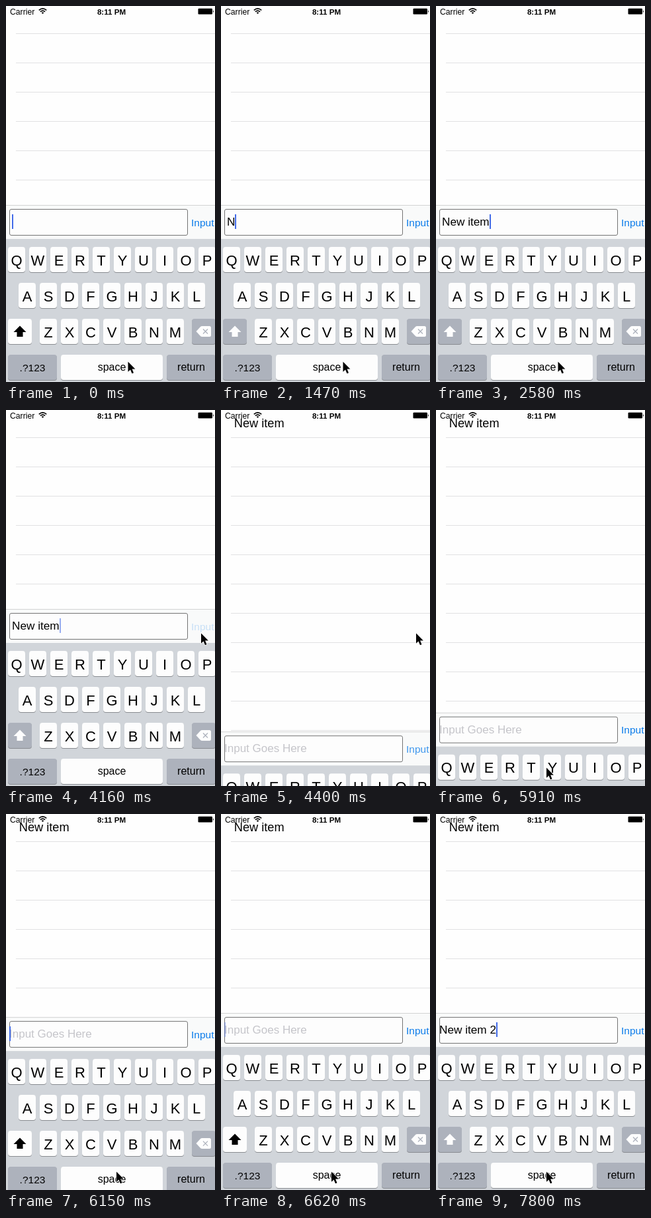
An HTML page for the animation above (8 s loop, 316 px wide and 565 px high).

```html
<!DOCTYPE html>
<html lang="en">
<head>
<meta charset="utf-8">
<title>Input bar above keyboard</title>
<style>
  html, body { margin: 0; width: 100%; height: 100%; overflow: hidden; background: #fefefe; }
  svg { display: block; width: 100vw; height: 100vh; }
  text { font-family: "Liberation Sans", Arial, sans-serif; white-space: pre; }
  .letter { font-size: 22px; text-anchor: middle; }
  .word { font-size: 16px; text-anchor: middle; }
</style>
</head>
<body>
<svg id="stage" viewBox="0 0 316 565">
  <rect width="316" height="565" fill="#fefefe"/>
  <g id="lines" fill="#e1e1e3"></g>
  <text id="row" x="19.8" y="26" font-size="18.2">New item</text>

  <g id="status">
    <text x="6" y="12.5" font-size="12.2">Carrier</text>
    <g fill="none" stroke="#000" stroke-width="1.6">
      <path d="M49.8 6.4Q55.5 1.4 61.2 6.4M51.9 8.7Q55.5 5.5 59.1 8.7"/>
      <path d="M53.6 9.9Q55.5 8.5 57.4 9.9L55.5 12Z" fill="#000" stroke="none"/>
    </g>
    <text x="159.5" y="12.5" font-size="11.6" font-weight="bold" text-anchor="middle">8:11 PM</text>
    <rect x="290.5" y="3.8" width="21.5" height="8.7" rx="1.3"/>
    <path d="M313 6.3Q315 8.2 313 10Z"/>
  </g>

  <g id="panel">
    <rect y="299" width="316" height="51" fill="#f9fafa"/>
    <rect y="299" width="316" height="1" fill="#d3d3d4"/>
    <rect x="5.5" y="305.5" width="269" height="39" rx="2.5" fill="#fdfdfd" stroke="#747474"/>
    <text id="hint" x="5" y="330" font-size="17" fill="#c5c5ca">Input Goes Here</text>
    <text id="typed" y="330" font-size="17.2"></text>
    <rect id="caret" y="313" width="2" height="22" fill="#426be8"/>
    <text id="button" x="280" y="330.5" font-size="15.5" fill="#0a7bea">Input</text>
    <rect y="350" width="316" height="216" fill="#d1d5da"/>
    <g id="keys"></g>
  </g>

  <path id="pointer" d="M0 0V15.2L3.5 12L6 17.8L8.5 16.8L6.1 11.1H10.9Z"
        stroke="#fff" stroke-width="1.3" paint-order="stroke"/>
</svg>
<script>
const LOOP = 8000, TRAVEL = 216;
const HIDE_AT = 4215, SHOW_AT = 5854;
const $ = id => document.getElementById(id);
const LIGHT = '#fdfdfd', DARK = '#adb2bc';

function key(x, y, w, fill, content = '', id = '') {
  return `<rect x="${x}" y="${y + 1}" width="${w}" height="38" rx="4" fill="#898c91"/>
    <rect ${id && `id="${id}"`} x="${x}" y="${y}" width="${w}" height="38" rx="4" fill="${fill}"/>${content}`;
}
const letterRow = (letters, x0, y) => [...letters].map((c, i) => {
  const x = x0 + i * 32;
  return key(x, y, 26, LIGHT, `<text class="letter" x="${x + 13}" y="${y + 27.5}">${c}</text>`);
}).join('');
const word = (label, x, y, size = 16) =>
  `<text class="word" x="${x}" y="${y}" style="font-size:${size}px">${label}</text>`;

$('lines').innerHTML = Array.from({ length: 12 }, (_, i) =>
  `<rect x="15" y="${41 + i * 44}" width="301" height="1"/>`).join('');

$('keys').innerHTML =
  letterRow('QWERTYUIOP', 3, 362) +
  letterRow('ASDFGHJKL', 19, 416) +
  letterRow('ZXCVBNM', 51, 470) +
  key(3, 470, 36, LIGHT, '<path id="arrow" d="M21 480.5L30.5 490H25.5V497H16.5V490H11.5Z" stroke-linejoin="round"/>', 'shift') +
  key(281, 470, 36, DARK,
    `<path d="M287.5 489L294 482Q295 481 296.500 481H307.500Q310 481 310 483.500V494.500Q310 497 307.500 497H296.500Q295 497 294 496Z" fill="#fdfdfd"/>
     <path d="M298 485.500L305 492.500M305 485.500L298 492.500" stroke="${DARK}" stroke-width="1.3"/>`) +
  key(3, 524, 74, DARK, word('.?123', 40, 549, 15.5)) +
  key(83, 524, 154, LIGHT, word('space', 160, 547.5)) +
  key(243, 524, 74, DARK, word('return', 280, 547.5));

// Each entry: time and the text shown from then on.
const typing = [
  [0, ''], [1470, 'N'], [1570, 'Ne'], [1660, 'New'], [1760, 'New '],
  [2170, 'New i'], [2350, 'New it'], [2460, 'New ite'], [2580, 'New item'],
  [4220, ''], [6920, 'N'], [7000, 'Ne'], [7080, 'New'], [7160, 'New i'],
  [7340, 'New it'], [7420, 'New ite'], [7510, 'New item'],
  [7690, 'New item '], [7800, 'New item 2']
];

// Caret opacity and pointer position, as time-stamped points.
const blink = [
  [0, 1], [430, 1], [590, 0], [890, 0], [1000, 1], [3040, 1], [3200, 0],
  [3500, 0], [3610, 1], [4090, 1], [4215, .2], [4220, 0], [6020, 0],
  [6080, 1], [6520, 1], [6680, 0], [6919, 0], [6920, 1], [LOOP, 1]
];
const pointerX = [[0, 184.5], [3030, 184.5], [3810, 292, 'inOut'], [3930, 295],
  [4930, 295], [4990, 276], [5550, 167, 'out'], [LOOP, 167]];
const pointerY = [[0, 534.5], [3030, 534.5], [3810, 336, 'inOut'], [3930, 335.5],
  [4930, 335.5], [4990, 353], [5550, 537.5, 'out'], [LOOP, 537.5]];

const eases = {
  linear: p => p,
  inOut: p => (1 - Math.cos(Math.PI * p)) / 2,
  out: p => Math.sin(Math.PI * p / 2)
};

function sample(points, t) {
  const i = Math.max(1, points.findIndex(p => p[0] > t));
  const [t0, a] = points[i - 1], [t1, b, ease = 'linear'] = points[i];
  return a + (b - a) * eases[ease]((t - t0) / (t1 - t0));
}

// Critically damped spring from 0 to 1.
function spring(ms) {
  if (ms <= 0) return 0;
  const x = ms * .01826;
  return 1 - (1 + x) * Math.exp(-x);
}

function draw(t) {
  const drop = TRAVEL * (t < SHOW_AT ? spring(t - HIDE_AT) : 1 - spring(t - SHOW_AT));
  $('panel').setAttribute('transform', `translate(0 ${drop.toFixed(2)})`);

  const added = t >= 4220;
  $('row').style.display = added ? '' : 'none';

  const text = typing.findLast(step => step[0] <= t)[1];
  const origin = added ? 5 : 9;
  const typed = $('typed');
  typed.textContent = text;
  typed.setAttribute('x', origin);
  $('hint').style.display = added && !text ? '' : 'none';
  $('caret').setAttribute('x', Math.round(origin + (text ? typed.getComputedTextLength() : 0)));
  $('caret').setAttribute('opacity', sample(blink, t));

  const pressed = t >= 4110 && t < 4220;
  const release = Math.min(1, (t - 4220) / 250);
  $('button').setAttribute('opacity', pressed ? .2 : t < 4110 ? 1 : .2 + .8 * release);

  const upper = t < 1470 || (t >= 4990 && t < 6920);
  $('shift').setAttribute('fill', upper ? LIGHT : DARK);
  $('arrow').setAttribute('fill', upper ? '#000' : '#fdfdfd');

  $('pointer').setAttribute('transform',
    `translate(${sample(pointerX, t).toFixed(2)} ${sample(pointerY, t).toFixed(2)})`);
}

const start = performance.now();
function tick() {
  draw((performance.now() - start) % LOOP);
  requestAnimationFrame(tick);
}
tick();
</script>
</body>
</html>
```
